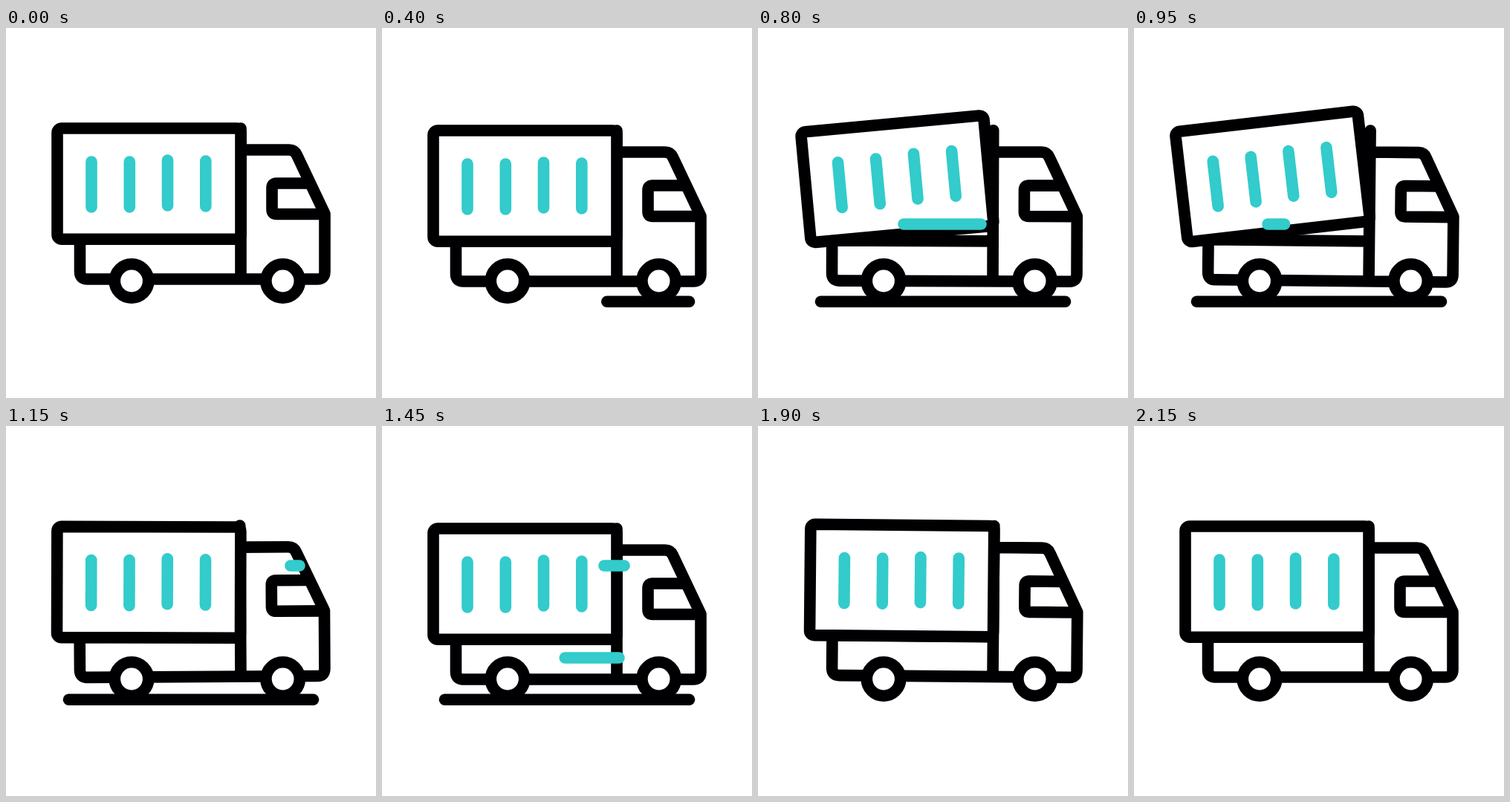
An HTML page that plays this animation: 498 px wide and 498 px high, repeating every 2.2 s.

```html
<!DOCTYPE html>
<html lang="en">
<head>
<meta charset="utf-8">
<title>Truck</title>
<style>
  html, body { margin: 0; width: 100%; height: 100%; overflow: hidden; background: #fff; }
  svg { display: block; width: 100vw; height: 100vh; }
  path, rect, circle, line { stroke: #000002; stroke-width: 15.6; stroke-linecap: round; stroke-linejoin: round; fill: none; }
  .solid { fill: #fff; }
  .teal { stroke: #33cbcb; }
</style>
</head>
<body>
<svg viewBox="0 0 498 498">
  <line id="ground"/>
  <g id="body">
    <path d="M99.5 287V331Q99.5 341 109.5 341H419Q429 341 429 331V253L391.5 174Q388.500 167 381 167H316M316 138V341M99.5 287H316"/>
    <path d="M409 212H364Q358 212 358 218V247.500Q358 253.500 364 253.500H428"/>
    <g id="cargo">
      <rect class="solid" x="69" y="138" width="247" height="149.300" rx="6"/>
      <path class="teal" d="M115 183V244M166.300 183V244M217.500 181V242M268.800 182V243"/>
    </g>
  </g>
  <circle class="solid" cx="169" cy="340.500" r="22.700"/>
  <circle class="solid" cx="372.600" cy="340.500" r="22.700"/>
  <line id="wind1" class="teal"/>
  <line id="wind2" class="teal"/>
  <line id="wind3" class="teal"/>
</svg>
<script>
const LOOP = 2200, STEP = 50;
const get = id => document.getElementById(id);
const ease = p => (1 - Math.cos(Math.PI * Math.min(1, Math.max(0, p)))) / 2;
const tween = (t, start, end) => ease((t - start) / (end - start));

// Eased value between [time, value] keys
function track(t, keys) {
  let value = keys[0][1];
  for (let i = 1; i < keys.length; i++)
    value += (keys[i][1] - keys[i - 1][1]) * tween(t, keys[i - 1][0], keys[i][0]);
  return value;
}

const bob = [[50, -3], [400, 0], [650, 0], [800, -0.7], [1150, -3], [1450, 0], [1850, -3]];
const frontPitch = [[700, 0], [950, 0.6], [1130, -0.35], [1160, -0.35], [1300, 0]];
const rearPitch = [[1660, 0], [1810, 1.15], [1980, 0]];
const cargoTilt = [[630, 0], [905, -8.1], [1110, 0], [1150, 0.5], [1280, 0]];

// Lines grow leftwards from their right end, which then follows
const lines = [
  { id: "ground", y: 368.3, right: 413.5, left: 84.5, head: [270, 600], tail: [1560, 1880] },
  { id: "wind1", y: 264, right: 300, left: 180, head: [640, 850], tail: [800, 1010] },
  { id: "wind2", y: 188, right: 395, left: 299, head: [1090, 1350], tail: [1260, 1555] },
  { id: "wind3", y: 312, right: 319, left: 200, head: [1290, 1570], tail: [1450, 1730] }
];

function drawLine(t, { id, y, right, left, head, tail }) {
  const at = span => right + (left - right) * tween(t, ...span);
  const el = get(id), visible = t > head[0] && t < tail[1];
  el.setAttribute("visibility", visible ? "visible" : "hidden");
  const ends = { x1: at(tail), x2: at(head), y1: y, y2: y };
  for (const name in ends) el.setAttribute(name, ends[name]);
}

function draw(now) {
  const t = Math.floor(now % LOOP / STEP) * STEP;
  get("body").setAttribute("transform",
    `translate(0 ${track(t, bob)}) rotate(${track(t, frontPitch)} 169 341) rotate(${track(t, rearPitch)} 373 341)`);
  get("cargo").setAttribute("transform", `rotate(${track(t, cargoTilt)} 98 266)`);
  for (const line of lines) drawLine(t, line);
}

let start;
function tick(now) {
  start ??= now;
  draw(now - start);
  requestAnimationFrame(tick);
}
draw(0);
requestAnimationFrame(tick);
</script>
</body>
</html>
```
